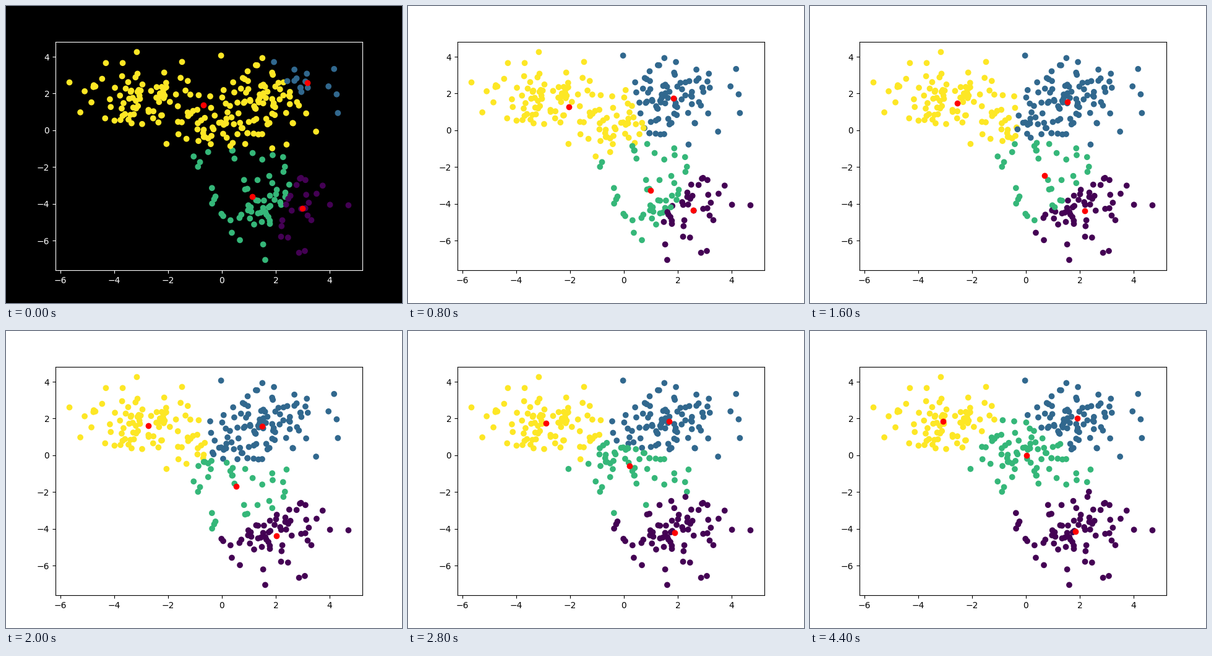
Recreate the animation shown at these times as a matplotlib script. Size 640x480 px, loop 5200 ms.

```python
import numpy as np
import matplotlib.pyplot as plt
from matplotlib.animation import FuncAnimation

STEPS = 13
STEP_MS = 400


def make_blobs(centers, per_center=75, seed=0):
    rng = np.random.RandomState(seed)
    points = np.vstack([rng.normal(c, 1, (per_center, 2)) for c in centers])
    order = np.arange(len(points))
    rng.shuffle(order)
    return points[order]


def lloyd(points, centers, steps):
    """Return (labels, updated centers) for each k-means step."""
    history = []
    for _ in range(steps):
        dist = np.linalg.norm(points[:, None] - centers, axis=2)
        labels = dist.argmin(axis=1)
        centers = np.array([points[labels == k].mean(axis=0)
                            for k in range(len(centers))])
        history.append((labels, centers))
    return history


points = make_blobs([(0, 0), (2, 2), (-3, 2), (2, -4)])
start = np.array([(3.48, -3.396), (4.21, 2.307), (1.5, -3.0), (1.656, 0.902)])
history = lloyd(points, start, STEPS)

fig, ax = plt.subplots(figsize=(6.4, 4.8), dpi=100)
dots = ax.scatter(*points.T, c=history[0][0], cmap="viridis", vmin=0, vmax=3)
means = ax.scatter(*history[0][1].T, c="r")
ax.set_xlim(ax.get_xlim())
ax.set_ylim(ax.get_ylim())


def set_theme(paper, ink):
    fig.set_facecolor(paper)
    ax.set_facecolor(paper)
    ax.tick_params(colors=ink)
    for spine in ax.spines.values():
        spine.set_edgecolor(ink)


def draw(i):
    # The opening step is shown white on black.
    set_theme(*(("black", "white") if i == 0 else ("white", "black")))
    labels, centers = history[i]
    dots.set_array(labels)
    means.set_offsets(centers)
    return dots, means


anim = FuncAnimation(fig, draw, frames=STEPS, interval=STEP_MS,
                     repeat=True, repeat_delay=0)
plt.show()
```
